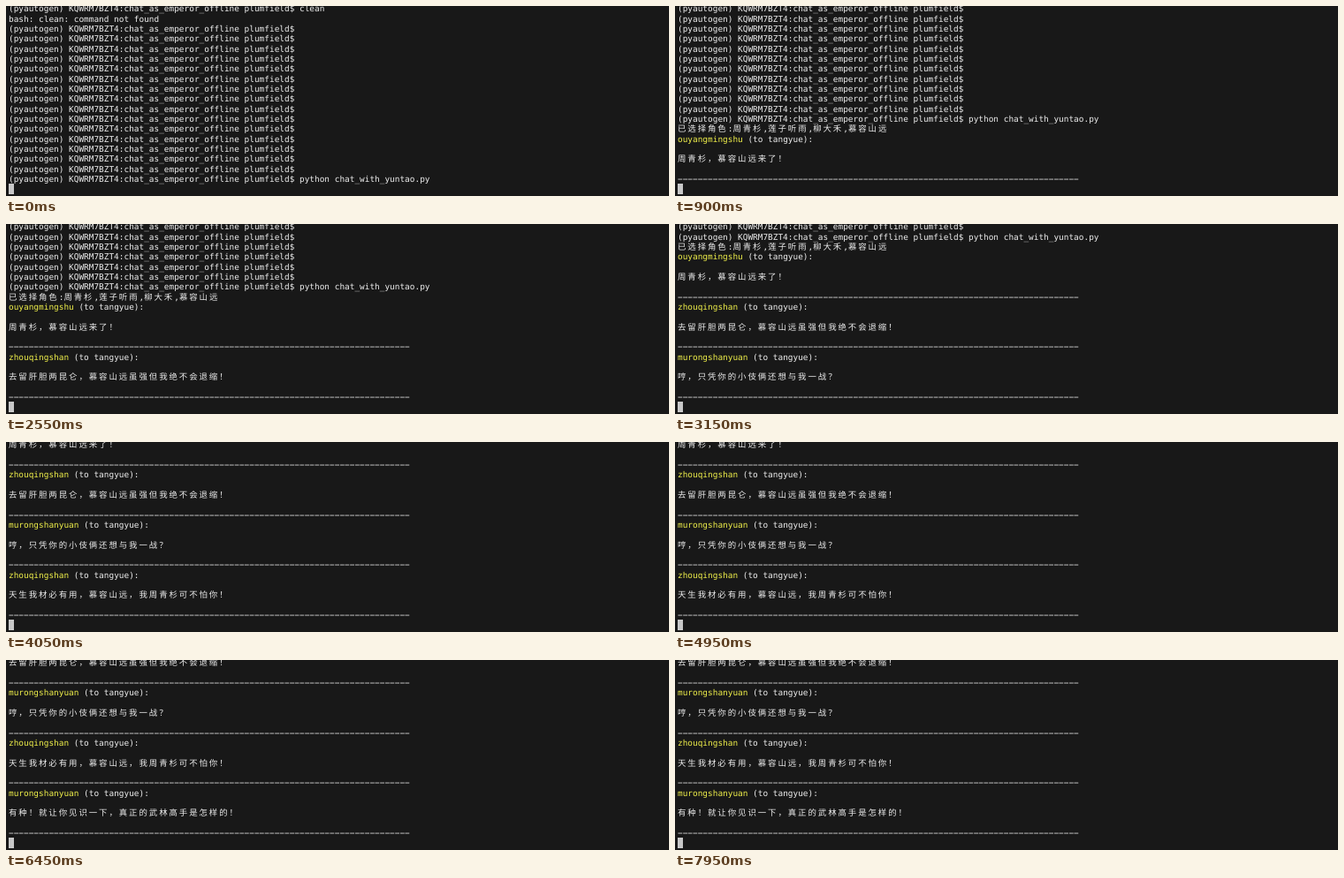
An HTML page for the animation above (8 s loop, 750 px wide and 215 px high).

```html
<!DOCTYPE html>
<html lang="zh-CN">
<head>
<meta charset="utf-8">
<title>Terminal chat</title>
<style>
  html, body { margin: 0; width: 100%; height: 100%; overflow: hidden; background: #181818; }
  #view { position: absolute; left: 3px; top: -1.7px; width: 747px; height: 203.94px; overflow: hidden; }
  #log { position: absolute; left: 0; top: 0; width: 100%; }
  .row {
    position: absolute; left: 0; height: 11.33px;
    font: 9.43px/11.33px "DejaVu Sans Mono", "Noto Sans Mono", monospace;
    color: #eee; white-space: pre; text-rendering: geometricPrecision;
    font-variant-ligatures: none;
  }
  .row i { font-style: normal; color: #f0f04a; }
  .row b {
    font-family: "Noto Sans CJK SC", "Noto Sans CJK", sans-serif;
    font-weight: 400; line-height: 0; letter-spacing: 1.92px;
  }
  #cursor { position: absolute; left: 3px; top: 201px; width: 6px; height: 12px; background: #c8c8c8; }
</style>
</head>
<body>
<div id="view"><div id="log"></div></div>
<div id="cursor"></div>
<script>
const PITCH = 11.33, LOOP = 8000;
const prompt = '(pyautogen) KQWRM7BZT4:chat_as_emperor_offline plumfield$ ';
const hero = '周青杉', rival = '慕容山远';
const heroId = 'zhouqingshan', rivalId = 'murongshanyuan';

const say = (who, text) => [`<i>${who}</i> (to tangyue):`, '', text, '', '−'.repeat(80)];

// Each batch of lines is printed at once, at its time in ms.
const batches = [
  [0, [prompt + 'clean', 'bash: clean: command not found',
       ...Array(15).fill(prompt), prompt + 'python chat_with_yuntao.py']],
  [600, [`已选择角色:${hero},莲子听雨,柳大禾,${rival}`,
         ...say('ouyangmingshu', `${hero},${rival}来了!`)]],
  [1650, say(heroId, `去留肝胆两昆仑,${rival}虽强但我绝不会退缩!`)],
  [3150, say(rivalId, '哼,只凭你的小伎俩还想与我一战?')],
  [4050, say(heroId, `天生我材必有用,${rival},我${hero}可不怕你!`)],
  [6450, say(rivalId, '有种!就让你见识一下,真正的武林高手是怎样的!')]
];

// Inside Chinese sentences punctuation takes a full double cell.
const widen = s => /^[\u4e00-\u9fff]/.test(s) && !s.includes(':')
  ? s.replace(/[,!?]/g, c => String.fromCharCode(c.charCodeAt(0) + 0xfee0)) : s;
const markup = s => widen(s).replace(/[\u4e00-\u9fff\uff00-\uff60]+/g, '<b>$&</b>');

const log = document.getElementById('log');
const frames = [];
let count = 0;

for (const [time, lines] of batches) {
  for (const line of lines) {
    const row = document.createElement('div');
    row.className = 'row';
    row.style.top = count++ * PITCH + 'px';
    row.innerHTML = markup(line);
    log.append(row);
  }
  frames.push({ offset: time / LOOP, top: (18 - count) * PITCH + 'px', easing: 'step-end' });
}
frames.push({ offset: 1, top: frames[frames.length - 1].top });
log.animate(frames, { duration: LOOP, iterations: Infinity });
</script>
</body>
</html>
```
